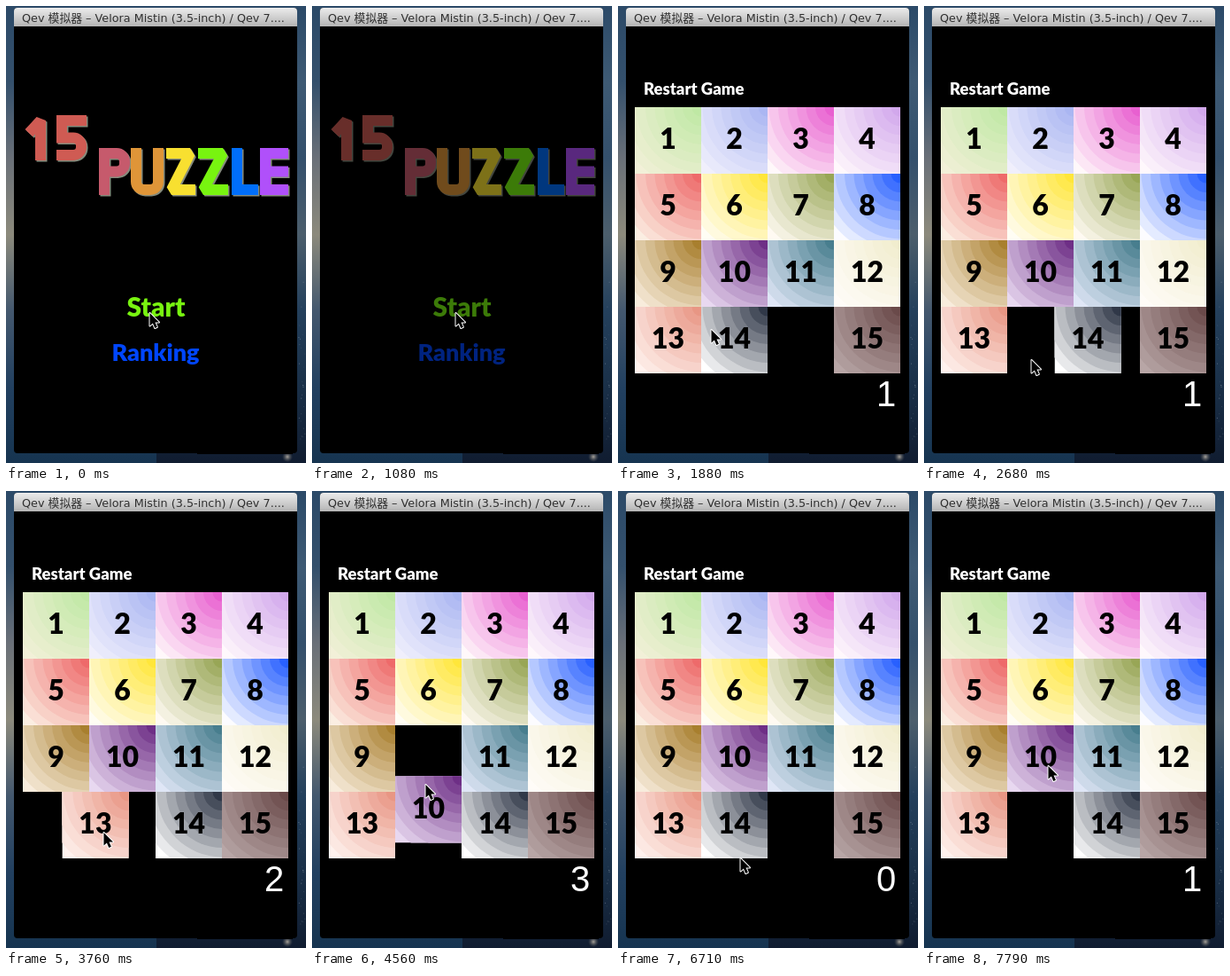
An HTML page with a canvas for the animation above (8000 ms loop, 339 by 515 pixels).

```html
<!DOCTYPE html>
<html lang="zh">
<head>
<meta charset="utf-8">
<title>15 Puzzle</title>
<style>
html, body { margin: 0; width: 100%; height: 100%; overflow: hidden; background: #142a44; }
canvas { display: block; width: 100vw; height: 100vh; }
</style>
</head>
<body>
<canvas id="stage"></canvas>
<script>
const W = 339, H = 515, LOOP = 8000, STEP = 268.6;
const TILE = 75, LEFT = 19, TOP = 114, SLIDE = 300, RESTART = 5850;
const canvas = document.getElementById('stage');
const ctx = canvas.getContext('2d');
const ratio = window.devicePixelRatio || 1;
canvas.width = W * ratio;
canvas.height = H * ratio;

const moves = [
  { tile: 14, start: 2472, dx: 1 },
  { tile: 13, start: 3081, dx: 1 },
  { tile: 13, start: 3638, dx: -1 },
  { tile: 10, start: 4336, dy: 1 },
  { tile: 10, start: 4925, dy: -1 },
  { tile: 14, start: 7371, dx: 1 }
];
const points = [1870, 2940, 4020, 4820, 6970];

// Pointer stops: step, x, y
const pointer = [
  [4, 162, 346], [6, 130, 362], [7, 105, 365], [8, 121, 399], [10, 121, 399],
  [11, 70, 375], [13, 110, 385], [14, 110, 385], [15, 129, 294], [16, 128, 296],
  [17, 128, 331], [19, 122, 331], [20, 102, 104], [21, 93, 85], [23, 93, 85],
  [24, 138, 403], [25, 138, 414], [26, 138, 414], [27, 141, 388], [28, 141, 388], [29, 140, 310]
];

// Top right corner colour and the colour it fades to
const shades = [
  '#bfe8a4 #f2f0d8', '#aab6f2 #f0effc', '#e860d0 #fff8fa', '#d2a8ec #fff8fc', '#ee6a6a #fbeee2',
  '#ffe63a #fffdf4', '#98a656 #fffaf2', '#2860ff #fcfcff', '#a87f2e #f8ecdc', '#6e2f86 #e8d8f0',
  '#487e8e #dfe6f6', '#f1edce #fffcf8', '#e89684 #fff2ee', '#303848 #ffffff', '#6a4a4a #b8a6a6'
].map(pair => pair.split(' '));

// Lettering as thick strokes on a 2 by 4 grid; r marks a round corner
const glyphs = {
  1: '01 20 24',
  5: '20 00 02 22r 24r 04',
  P: '04 00 20r 22r 02',
  U: '00 04r 24r 20',
  Z: '00 20 04 24',
  L: '00 04 24',
  E: '20 00 04 24|02 22'
};
const logo = [
  ['1', '#cf5b53', 24, 21], ['5', '#cf5b53', 57, 34],
  ['P', '#c65a6c', 105, 35], ['U', '#df9538', 141, 37], ['Z', '#f8e030', 181, 33],
  ['Z', '#78f410', 217, 34], ['L', '#006efa', 255, 30], ['E', '#b050fa', 287, 32]
];

const arrow = new Path2D('M0 0V14.5L3.4 11.4L5.8 17L8.4 15.8L6 10.4H10.5Z');

const clamp = k => Math.min(1, Math.max(0, k));
const lerp = (a, b, k) => a + (b - a) * k;

function mix(a, b, k) {
  const part = (hex, i) => parseInt(hex.slice(i, i + 2), 16);
  return 'rgb(' + [1, 3, 5].map(i => Math.round(lerp(part(a, i), part(b, i), k))) + ')';
}

function seeded(seed) {
  return () => (seed = seed * 16807 % 2147483647) / 2147483647;
}

function text(str, x, y, font, color, align = 'left') {
  ctx.font = font;
  ctx.fillStyle = color;
  ctx.textAlign = align;
  ctx.fillText(str, x, y);
}

function fillGradient(x, y, w, h, colors) {
  const g = ctx.createLinearGradient(0, y, 0, y + h);
  colors.forEach((color, i) => g.addColorStop(i / (colors.length - 1), color));
  ctx.fillStyle = g;
  ctx.fillRect(x, y, w, h);
}

function drawDesktop() {
  fillGradient(0, 0, 170, H, ['#2c4a68', '#34506c', '#6a7078', '#8c8a7c', '#44586e', '#224060', '#163450']);
  fillGradient(170, 0, 169, H, ['#2c4a68', '#3e5a74', '#34506c', '#4c5e6c', '#24405c', '#1a3048', '#101c30']);
  const rand = seeded(7);
  for (let i = 0; i < 30; i++) {
    ctx.fillStyle = `rgba(200,210,220,${rand() * 0.4})`;
    ctx.fillRect(330 + rand() * 8, 300 + rand() * 200, 1, 1);
  }
  const star = ctx.createRadialGradient(318, 508, 0, 318, 508, 6);
  star.addColorStop(0, '#a8a39c');
  star.addColorStop(1, 'rgba(90,90,90,0)');
  ctx.fillStyle = star;
  ctx.fillRect(312, 502, 12, 12);
}

function drawWindow() {
  ctx.fillStyle = '#000';
  ctx.fillRect(216, 500, 108, 5);
  ctx.beginPath();
  ctx.roundRect(9, 2, 320, 502, 4);
  ctx.fill();
  ctx.save();
  ctx.beginPath();
  ctx.roundRect(9, 2, 320, 21, [4, 4, 0, 0]);
  ctx.clip();
  fillGradient(9, 2, 320, 21, ['#ececec', '#b4b4b4']);
  ctx.restore();
  text('Qev 模拟器 – Velora Mistin (3.5-inch) / Qev 7....', 18, 18,
    '12.8px "DejaVu Sans", "Noto Sans CJK SC", "Noto Sans CJK", sans-serif', '#303030');
}

function drawGlyph(char, color, x, w, shift) {
  const weight = 12, h = char > '9' ? 53 : 51, y = char > '9' ? 160 : 123;
  const place = ([col, row]) => [
    x + shift + lerp(weight / 2, w - weight / 2, col / 2),
    y + shift + lerp(weight / 2, h - weight / 2, row / 4)
  ];
  ctx.beginPath();
  for (const stroke of glyphs[char].split('|')) {
    const spots = stroke.split(' ');
    ctx.moveTo(...place(spots[0]));
    spots.slice(1).forEach((spot, i) => {
      const next = spots[i + 2];
      if (next) ctx.arcTo(...place(spot), ...place(next), spot[2] ? 9 : 0);
      else ctx.lineTo(...place(spot));
    });
  }
  ctx.lineWidth = weight;
  ctx.lineCap = 'square';
  ctx.lineJoin = 'miter';
  ctx.miterLimit = 1.5;
  ctx.strokeStyle = color;
  ctx.stroke();
}

function drawMenu() {
  for (const [char, color, x, w] of logo) {
    drawGlyph(char, '#858b7c', x, w, 1.5);
    drawGlyph(char, color, x, w, 0);
  }
  text('Start', 169.5, 350, '900 30px Lato, sans-serif', '#78f410', 'center');
  text('Ranking', 169, 400, '900 27px Lato, sans-serif', '#0046ff', 'center');
}

function drawTile(n, x, y) {
  const [near, far] = shades[n - 1], rings = 9, ring = 10.5;
  ctx.save();
  ctx.beginPath();
  ctx.rect(x, y, TILE, TILE);
  ctx.clip();
  ctx.fillStyle = far;
  ctx.fillRect(x, y, TILE, TILE);
  for (let i = rings - 1; i >= 0; i--) {
    ctx.fillStyle = mix(near, far, i / rings);
    ctx.beginPath();
    ctx.arc(x + TILE, y, ring * (i + 1), 0, Math.PI * 2);
    ctx.fill();
  }
  ctx.restore();
  text(String(n), x + TILE / 2, y + 47, '900 32px Lato, sans-serif', '#000', 'center');
}

function drawGame(t) {
  // A restart forgets everything that happened before it
  const counts = time => time <= t && (t < RESTART || time > RESTART);
  text('Restart Game', 29, 100, '900 18.5px Lato, sans-serif', '#fff');
  for (let n = 1; n <= 15; n++) {
    const cell = n === 15 ? 15 : n - 1;
    let col = cell % 4, row = Math.floor(cell / 4);
    for (const { tile, start, dx = 0, dy = 0 } of moves) {
      if (tile !== n || !counts(start)) continue;
      const k = clamp((t - start) / SLIDE);
      col += dx * k;
      row += dy * k;
    }
    drawTile(n, LEFT + col * TILE, TOP + row * TILE);
  }
  text(String(points.filter(counts).length), 292, 451, '40px "Liberation Sans", sans-serif', '#fff');
}

function drawPointer(step) {
  const next = pointer.findIndex(stop => stop[0] >= step);
  const b = pointer[next], a = pointer[Math.max(0, next - 1)];
  const k = a === b ? 0 : clamp((step - a[0]) / (b[0] - a[0]));
  ctx.save();
  ctx.translate(lerp(a[1], b[1], k) + 0.5, lerp(a[2], b[2], k));
  ctx.lineJoin = 'round';
  ctx.lineWidth = 2;
  ctx.strokeStyle = '#fff';
  ctx.stroke(arrow);
  ctx.fillStyle = '#000';
  ctx.fill(arrow);
  ctx.restore();
}

function fade(alpha, draw) {
  if (!alpha) return;
  draw();
  ctx.fillStyle = `rgba(0,0,0,${1 - alpha})`;
  ctx.fillRect(9, 24, 320, 476);
}

function render(now) {
  // The screen refreshes only once per step
  const step = Math.min(29, Math.floor((now % LOOP + 12) / STEP));
  const t = step * STEP;
  ctx.setTransform(ratio, 0, 0, ratio, 0, 0);
  drawDesktop();
  drawWindow();
  fade(clamp((1210 - t) / 270), drawMenu);
  fade(clamp((t - 1450) / 270), () => drawGame(t));
  drawPointer(step);
}

const start = performance.now();
function tick() {
  render(performance.now() - start);
  requestAnimationFrame(tick);
}
tick();
</script>
</body>
</html>
```
